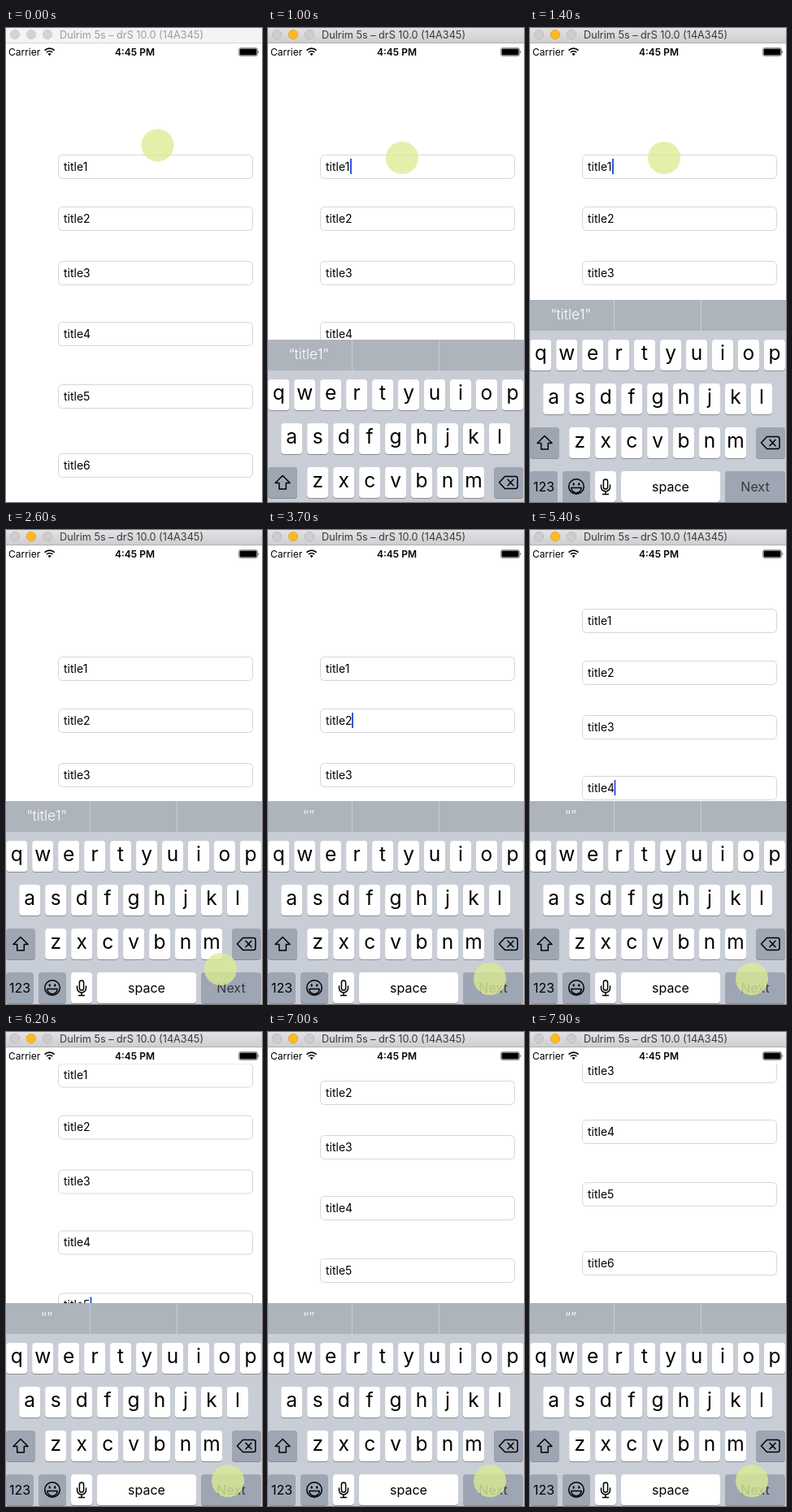
Animation, 315 px wide and 584 px high, one loop 8 s. Source, as an HTML page:

```html
<!DOCTYPE html>
<html lang="en">
<head>
<meta charset="utf-8">
<title>Text field focus demo</title>
<style>
  html, body { margin: 0; width: 100%; height: 100%; overflow: hidden; background: #fff; }
  svg { display: block; width: 315px; height: 584px; font-family: Inter, Roboto, sans-serif; }
  .mid { text-anchor: middle; }
  .field { fill: #fff; stroke: #d6d6d6; }
  .icon { fill: none; stroke: #000; stroke-width: 1.5; stroke-linejoin: round; stroke-linecap: round; }
</style>
</head>
<body>
<svg viewBox="0 0 315 584" xmlns="http://www.w3.org/2000/svg">
  <defs>
    <linearGradient id="barFill" x2="0" y2="1">
      <stop stop-color="#e4e2e4"/><stop offset="1" stop-color="#cecccf"/>
    </linearGradient>
    <clipPath id="page"><rect y="39" width="315" height="545"/></clipPath>
  </defs>
  <rect width="315" height="584" fill="#fff"/>

  <g clip-path="url(#page)">
    <g id="form">
      <g id="fields" font-size="14"></g>
      <rect id="caret" width="2" height="19" fill="#3058e0"/>
    </g>
  </g>

  <g id="status" font-size="12">
    <text x="3" y="34">Carrier</text>
    <g fill="none" stroke="#000" stroke-width="1.7">
      <path d="M47.6 27.6a8.6 8.6 0 0 1 12 0M49.9 30a5.3 5.3 0 0 1 7.4 0"/>
    </g>
    <path d="M53.6 34.2l-2-2.2a2.9 2.9 0 0 1 4 0z"/>
    <text class="mid" x="158.5" y="34" font-weight="600">4:45 PM</text>
    <rect x="286.5" y="24.5" width="23" height="10" rx="2" fill="#fff" stroke="#777" stroke-width=".8"/>
    <rect x="287.5" y="25.5" width="21" height="8" rx="1"/>
    <path d="M310.3 27.7q1.6 1.8 0 3.6z"/>
  </g>

  <g id="titleBar">
    <rect id="bar" width="315" height="19"/>
    <rect id="barEdge" y="18" width="315" height="1"/>
    <g id="buttons"></g>
    <text id="barText" x="66" y="13.4" font-size="12.7">Dulrim 5s – drS 10.0 (14A345)</text>
  </g>

  <g id="keyboard">
    <rect y="334" width="315" height="250" fill="#c9cdd6"/>
    <rect y="334" width="315" height="38" fill="#adb4bc"/>
    <path d="M103.5 334v38M210.5 334v38" stroke="#c6ccd3"/>
    <text id="hint" class="mid" x="50" y="358" font-size="17.5" font-weight="300" fill="#fff"></text>
    <g id="keys"></g>
    <g class="icon">
      <path d="M18 501.5l9 9h-4.7v7.5h-8.6v-7.5H9z"/>
      <path d="M291.5 502.5H304.5q2.5 0 2.5 2.5v10q0 2.5-2.5 2.5H291.5l-7-7.5zM295 506.3l7 7.4M302 506.3l-7 7.4"/>
      <circle cx="57" cy="564" r="9.3"/>
      <path d="M50.8 565.5h12.4a6.2 6.2 0 0 1-12.4 0z"/>
      <path d="M87.5 562v2.5a5.5 5.5 0 0 0 11 0V562M93 570v3.5M89.5 573.5h7"/>
      <rect x="90.4" y="555" width="5.2" height="12" rx="2.6"/>
    </g>
    <ellipse cx="53.7" cy="561" rx="1.2" ry="1.8"/>
    <ellipse cx="60.3" cy="561" rx="1.2" ry="1.8"/>
  </g>

  <circle id="pointer" r="20" fill="#dcec94" fill-opacity=".78"/>
</svg>
<script>
const LOOP = 8000, TICK = 100;
const FIELD_TOPS = [156.5, 220.5, 287.5, 362.5, 439.5, 524.5];
const CARET_X = [101, 103, 103, 103.5, 103.5, 103.5];
// Moment each field takes focus; the seventh lies below the visible page.
const FOCUS = [1000, 3350, 4180, 4930, 5850, 6750, 7600];
const SCROLLS = [[4880, 59], [5860, 77], [6825, 85], [7660, 70]];
const SCROLL_TIME = 500;
const KEY = '#fff', DARK_KEY = '#9fa6b3';

const $ = id => document.getElementById(id);
const set = (el, attrs) => { for (const k in attrs) el.setAttribute(k, attrs[k]); };
function add(parent, tag, attrs, text) {
  const el = document.createElementNS('http://www.w3.org/2000/svg', tag);
  set(el, attrs);
  if (text) el.textContent = text;
  parent.appendChild(el);
  return el;
}

function addKey(x, y, width, fill, label, size = 16, color = '#000') {
  add($('keys'), 'rect', { x, y: y + 1, width, height: 38, rx: 4, fill: '#898c92' });
  add($('keys'), 'rect', { x, y, width, height: 38, rx: 4, fill });
  if (label) {
    const baseline = y + (size > 20 ? 25 : 24.5);
    add($('keys'), 'text', { x: x + width / 2, y: baseline, 'font-size': size, fill: color, class: 'mid' }, label);
  }
}

function build() {
  FIELD_TOPS.forEach((y, i) => {
    add($('fields'), 'rect', { x: 64.5, y, width: 239, height: 29, rx: 5, class: 'field' });
    add($('fields'), 'text', { x: 71, y: y + 19.3 }, 'title' + (i + 1));
  });
  [11, 31, 51].forEach(cx => add($('buttons'), 'circle', { cx, cy: 8, r: 5.7 }));
  [['qwertyuiop', 0, 383], ['asdfghjkl', 16, 437], ['zxcvbnm', 48, 491]].forEach(([letters, x, y]) =>
    [...letters].forEach((c, i) => addKey(x + .2 + i * 31.97, y, 26, KEY, c, 24.5)));
  addKey(0, 491, 36, DARK_KEY);
  addKey(278, 491, 36, DARK_KEY);
  addKey(0, 545, 34, DARK_KEY, '123');
  addKey(40, 545, 34, DARK_KEY);
  addKey(80, 545, 26, KEY);
  addKey(112, 545, 122, KEY, 'space');
  addKey(240, 545, 74, DARK_KEY, 'Next', 16, '#33373f');
}

const progress = (t, start, end) => Math.min(1, Math.max(0, (t - start) / (end - start)));
const smooth = p => p * p * (3 - 2 * p);
const easeOut = p => 1 - (1 - p) ** 2;
const mix = (a, b, p) => a + (b - a) * p;

function pointerAt(t) {
  const legs = [
    [100, 500, 165, 160, smooth],
    [2100, 2600, 264, 541, smooth],
    [2600, 3000, 273, 553, easeOut]
  ];
  let x = 186.5, y = 144.5;
  for (const [start, end, toX, toY, ease] of legs) {
    const p = ease(progress(t, start, end));
    x = mix(x, toX, p);
    y = mix(y, toY, p);
  }
  return [x, y];
}

function caretOpacity(age) {
  const phase = age % 1000;
  return phase < 500 ? 1 : phase < 550 ? .85 : phase < 900 ? 0 : .5;
}

function drawTitleBar(active) {
  set($('bar'), { fill: active ? 'url(#barFill)' : '#f4f4f4' });
  set($('barEdge'), { fill: active ? '#b3b1b4' : '#d5d5d5' });
  set($('barText'), { fill: active ? '#3a3a3a' : '#9c9c9c' });
  [...$('buttons').children].forEach((dot, i) => set(dot, active
    ? { fill: i === 1 ? '#fdb924' : '#cecccf', stroke: i === 1 ? '#e0a01c' : '#b6b4b7', 'stroke-width': .7 }
    : { fill: '#d3d3d3', stroke: '#c6c6c6', 'stroke-width': .7 }));
}

function draw(t) {
  drawTitleBar(t >= 800);

  const offset = SCROLLS.reduce((sum, [start, distance]) =>
    sum + distance * smooth(progress(t, start, start + SCROLL_TIME)), 0);
  set($('form'), { transform: `translate(0 ${-Math.round(offset * 2) / 2})` });

  const focused = FOCUS.filter(start => t >= start).length - 1;
  const hasCaret = focused in FIELD_TOPS;
  set($('caret'), {
    x: hasCaret ? CARET_X[focused] : 0,
    y: hasCaret ? FIELD_TOPS[focused] + 4.5 : 0,
    opacity: hasCaret ? caretOpacity(t - FOCUS[focused]) : 0
  });

  const drop = t < 1000 ? 260 : t < 1500 ? 50 * Math.exp((1000 - t) / 110) : 0;
  set($('keyboard'), { transform: `translate(0 ${Math.round(drop)})` });
  $('hint').textContent = t < 3500 ? '“title1”' : '“”';

  const [cx, cy] = pointerAt(t);
  set($('pointer'), { cx, cy });
}

build();
const begin = performance.now();
function frame() {
  const t = (performance.now() - begin) % LOOP;
  draw(Math.floor(t / TICK) * TICK);
  requestAnimationFrame(frame);
}
frame();
</script>
</body>
</html>
```
